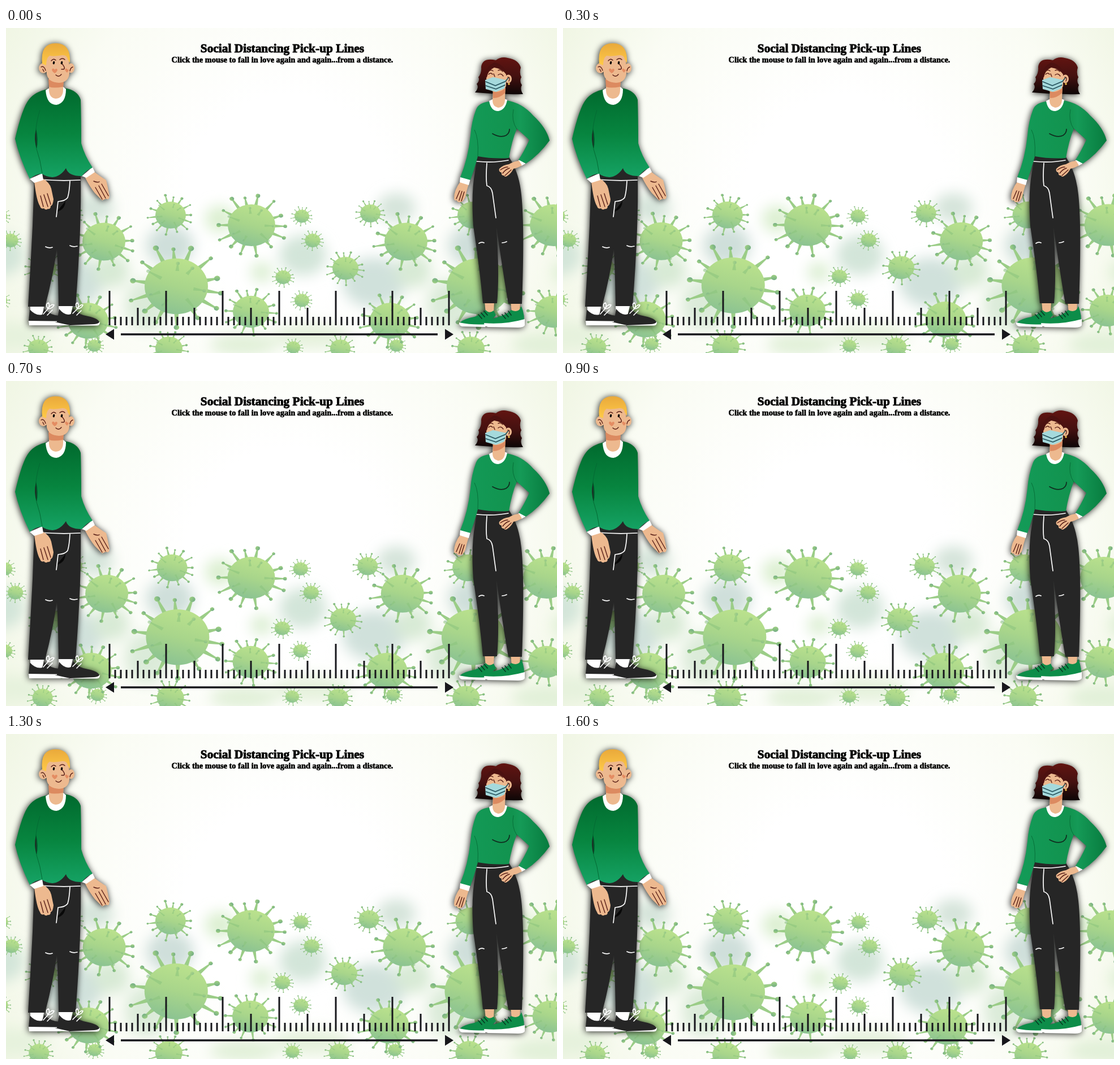
Write an HTML page that moves like this. It is 974x575 px and loops after 1700 ms.

```html
<!DOCTYPE html>
<html lang="en">
<head>
<meta charset="utf-8">
<title>Social Distancing Pick-up Lines</title>
<style>
html, body { margin: 0; width: 100%; height: 100%; overflow: hidden; }
svg { display: block; width: 974px; height: 575px; }
.person { filter: drop-shadow(-1px 1px 6px rgba(0, 0, 0, .85)); }
.line { fill: none; stroke-width: 1.7; stroke-linecap: round; stroke-linejoin: round; }
.white { stroke: #fff; }
.brown { stroke: #5a2018; stroke-width: 1.4; }
.skin { fill: #edb98f; }
.shade { fill: #dc8a60; }
.pants { fill: #262626; }
text { font: bold 21.4px "Liberation Serif", Times, serif; text-anchor: middle; stroke: #000; stroke-width: .9; }
.sub { font-size: 14.4px; stroke-width: .6; }
</style>
</head>
<body>
<svg viewBox="0 0 974 575">
<defs>
  <radialGradient id="sky" gradientUnits="userSpaceOnUse" cx="500" cy="300" r="600">
    <stop offset=".3" stop-color="#fff"/><stop offset=".7" stop-color="#fafcf4"/><stop offset="1" stop-color="#eff5e2"/>
  </radialGradient>
  <linearGradient id="body" x1=".65" y1="0" x2=".35" y2="1">
    <stop stop-color="#bbe28d"/><stop offset=".5" stop-color="#a8d58b"/><stop offset="1" stop-color="#8ac292"/>
  </linearGradient>
  <linearGradient id="knob" x1=".6" y1="0" x2=".4" y2="1">
    <stop stop-color="#9fd083"/><stop offset="1" stop-color="#74ae84"/>
  </linearGradient>
  <linearGradient id="knit" gradientUnits="userSpaceOnUse" x1="0" y1="108" x2="0" y2="268">
    <stop stop-color="#016a2e"/><stop offset=".5" stop-color="#07853f"/><stop offset="1" stop-color="#16a466"/>
  </linearGradient>
  <linearGradient id="top" gradientUnits="userSpaceOnUse" x1="815" y1="0" x2="960" y2="0">
    <stop stop-color="#139a57"/><stop offset=".55" stop-color="#12934f"/><stop offset=".65" stop-color="#159a57"/><stop offset="1" stop-color="#087c3f"/>
  </linearGradient>
  <linearGradient id="blond" x1="0" y1="0" x2="0" y2="1">
    <stop stop-color="#e9a93b"/><stop offset="1" stop-color="#ffca48"/>
  </linearGradient>
  <linearGradient id="brunette" x1="0" y1="0" x2="0" y2="1">
    <stop stop-color="#611411"/><stop offset=".5" stop-color="#451110"/><stop offset="1" stop-color="#0d0606"/>
  </linearGradient>
  <filter id="soft" x="-20%" y="-50%" width="140%" height="200%"><feGaussianBlur stdDeviation="12"/></filter>
  <g id="rim"></g>
  <g id="front"></g>
</defs>

<rect width="974" height="575" fill="url(#sky)"/>
<g id="clouds" filter="url(#soft)"></g>
<g id="viruses"></g>

<text x="488.5" y="43">Social Distancing Pick-up Lines</text>
<text x="488.5" y="61" class="sub">Click the mouse to fall in love again and again...from a distance.</text>

<g fill="#17171c">
  <path id="ticks" fill="none" stroke="#17171c" stroke-width="3"/>
  <path d="M203 540.3H763V543.8H203ZM176 542L191 532.5V551.5ZM791 542L776 532.5V551.5Z"/>
</g>

<g class="person">
  <path class="pants" d="M50 266L62 255L106 247L132 258Q134 350 123 492H93Q92 430 90 390Q83 440 69 493H39Q43 430 47 350Z"/>
  <path class="line white" d="M60 268Q95 271 131 269M113 271Q112 290 109 300Q105 306 92 307L89 334M70 387Q76 390 82 388M113 385Q119 388 126 386"/>
  <path d="M92 322Q100 313 105 306Q105 320 91 325Z" fill="#080808"/>

  <path fill="#fff" d="M43 493H67L64 509H43ZM93 492H118L114 509H94Z"/>
  <path fill="#262626" d="M40 519L42 498Q53 510 64 507L68 497Q78 508 94 509Q115 512 116 520Z"/>
  <path fill="#fff" d="M40 518L116 519V526H41Z"/>
  <path fill="#262626" d="M90 520L94 497Q104 510 115 506L119 496Q129 508 145 510Q164 514 165 521Z"/>
  <path fill="#fff" d="M113 525L166 520Q166 526 161 526.5H113Z"/>
  <path fill="#262626" d="M86 520H165Q164 523 156 524L113 526Z"/>
  <path class="line white" d="M66 506L74 497Q69 488 75 486Q78 490 74 497Q80 487 85 490Q83 496 74 497M73 508L82 499M118 505L126 497Q121 488 126 486Q130 489 126 497Q132 488 136 490Q134 496 126 497M125 508L133 500"/>

  <path class="skin" d="M50 272L66 267Q77 273 80 284L84 303Q83 314 79 315Q79 321 74 320Q70 323 67 319Q62 321 60 315Q54 306 50 272Z"/>
  <path class="line brown" d="M61 297L66 316M67 295L74 316M73 293L79 312"/>
  <path class="skin" d="M139 263L154 253Q167 263 177 269Q180 281 183 298Q182 305 177 302L170 305L157 292Q148 281 139 263Z"/>
  <path class="line brown" d="M155 271Q162 274 165 272M158 282L170 303M164 279L176 301M169 276L181 297"/>
  <path fill="#fff" d="M42 267L64 257L66 269L50 274ZM134 262L153 246L157 255L142 265Z"/>

  <path fill="url(#knit)" d="M73 108Q51 113 41 126Q29 140 16 196Q23 228 42 267Q52 258 64 258Q70 263 82 264Q96 263 106 248Q110 262 134 262Q141 252 153 247Q139 226 133 204Q133 160 132 127Q127 110 103 106Z"/>
  <path fill="#00542a" d="M53 177Q49 197 54 215Q58 198 53 177Z"/>
  <path fill="#202b25" d="M53 181Q49 196 54 212Z"/>
  <path fill="none" stroke="#046a34" stroke-width="1" d="M60 145Q54 165 53 179M54 214Q61 234 64 257"/>

  <path fill="#fff" d="M70 110Q72 136 89 136Q106 133 106 108L101 104L75 107Z"/>
  <path class="skin" d="M76 82L102 84L101 109Q101 124 88 125Q77 124 76 111Z"/>
  <path class="shade" d="M75 90Q86 99 102 95L101 104Q84 107 76 104Z"/>
  <ellipse class="skin" cx="66" cy="71" rx="8" ry="9"/>
  <ellipse class="skin" cx="115" cy="71" rx="6" ry="8.5"/>
  <path class="skin" d="M70 46H111L112 80Q111 96 94 97Q75 96 72 82Z"/>
  <path fill="url(#blond)" d="M64 63Q60 27 88 27Q115 27 113 62L109 55Q108 48 100 48Q85 51 77 49Q71 53 71 66Z"/>
  <path class="line brown" d="M62 69Q67 66 70 75M65 73L67 77M118 69Q114 70 113 76M98 62Q106 71 102 73H98M80 58Q84 53 88 57M95 56Q100 52 104 56M88 83Q93 88 98 82"/>
  <path d="M83 61a1.6 2.2 0 1 0 3 1a1.6 2.2 0 1 0-3-1M97 61a1.6 2.2 0 1 0 3 1a1.6 2.2 0 1 0-3-1"/>
  <path fill="#e48c62" d="M86 80Q79 75 82 72Q85 71 86 74Q89 70 91 74Q90 78 86 80M108 79Q103 75 105 72Q108 71 109 74Q111 72 111 75Z"/>
</g>

<g class="person">
  <path class="skin" d="M846 484H863L862 505H848ZM892 484H909L908 505H894Z"/>
  <path class="pants" d="M834 226Q863 229 889 228Q907 255 911 295Q917 350 912 488H888Q878 430 866 345Q873 430 868 487H843Q838 430 826 350Q822 290 829 255Z"/>
  <path class="line white" d="M832 236Q862 239 888 234M850 239Q848 265 850 279Q858 281 860 292L866 336M836 381Q840 378 845 380M877 380Q881 380 885 378"/>

  <path class="skin" d="M803 272L818 276Q814 288 812 299Q807 309 803 308Q798 309 797 305Q792 306 792 301Q792 287 803 272Z"/>
  <path class="line brown" d="M802 288L796 302M806 289L801 305M810 290L805 306"/>
  <path fill="#fff" d="M803 263L821 267L818 278L802 273ZM905 235L914 229L920 239L911 244Z"/>
  <path class="skin" d="M907 235L912 243Q904 248 897 249Q893 257 887 261Q882 265 880 261Q875 261 876 256Q870 254 872 249Q879 242 889 241Q899 235 907 235Z"/>
  <path class="line brown" d="M874 251Q881 246 887 246M878 257Q883 250 890 248M882 261L893 251"/>

  <path fill="url(#top)" d="M854 130Q836 132 831 144Q823 165 821 190Q817 230 803 264L821 269Q828 250 834 227Q861 232 889 230Q894 200 903 178L925 198Q915 220 906 233L919 240Q942 225 961 199Q955 176 932 155Q912 132 884 128Z"/>
  <path fill="none" stroke="#077039" d="M828 180Q836 195 834 227M897 144Q893 164 903 179"/>
  <path class="line" stroke="#102b1e" d="M860 187Q874 195 884 190Q890 186 890 179"/>

  <path fill="url(#brunette)" d="M866 57Q875 50 887 53Q906 56 910 70Q907 80 911 87Q907 94 912 101Q908 108 914 117Q872 118 829 114Q837 105 832 99Q838 93 835 87Q841 80 840 69Q842 52 866 57Z"/>
  <path fill="#fff" d="M854 129Q857 147 870 147Q883 145 886 127L880 125L860 126Z"/>
  <path class="skin" d="M861 105L883 100L882 128Q881 140 870 141Q860 139 860 128Z"/>
  <path class="shade" d="M861 112Q874 116 883 105L882 115Q873 124 861 124Z"/>
  <ellipse class="skin" cx="888" cy="90" rx="6" ry="7.5"/>
  <path class="skin" d="M849 87Q849 73 860 67Q876 65 884 80V103Q877 113 864 113Q849 110 849 87Z"/>
  <path fill="#4c1110" d="M848 89Q845 70 863 61Q879 63 887 83L884 82Q877 72 863 70Q852 75 850 87Z"/>
  <path fill="#a5d9dc" d="M847 92L861 87L884 92L881 107L866 113L848 108Z"/>
  <path class="line" stroke="#24525c" stroke-width="1.3" d="M848 95L865 102L884 94M848 102L866 108L882 101M884 93L888 88"/>
  <path class="line brown" d="M853 82Q857 78 860 82M870 83Q875 79 879 85M854 76Q858 73 861 76M870 75Q875 73 878 77M862 81L864 86M887 87Q892 87 889 94"/>
  <circle cx="889" cy="99" r="1.8" fill="#f2c14a"/>

  <path fill="#0d8d49" d="M848 499Q838 510 819 513Q805 517 801 523L850 526L866 508L862 500Q854 506 848 499Z"/>
  <path fill="#fff" d="M801 521Q825 526 850 524L847 529L806 528Q800 526 801 521Z"/>
  <path fill="#0d8d49" d="M893 499Q883 509 864 513Q850 517 846 524H915Q918 509 911 492Q907 505 893 499Z"/>
  <path fill="#fff" d="M845 522Q882 525 917 515L917 526Q915 530 905 530L852 529Q845 527 845 522Z"/>
  <path class="line" stroke="#063c22" d="M835 507L841 514M840 504L846 511M845 501L851 508M877 507L883 514M882 504L888 511M888 501L893 508"/>
</g>
</svg>
<script>
const $ = id => document.getElementById(id);
const TILE = 534;
const tiled = (x, reach) => [x - TILE, x, x + TILE].filter(v => v > -reach && v < 974 + reach);

// One spike on a unit virus, pointing right before it is turned.
const spike = (angle, from, to, width, tip) => `<g transform="rotate(${angle})">
  <path d="M${from} ${-width}L${to} ${-tip * .3}V${tip * .3}L${from} ${width}Z"/>
  <circle cx="${to}" r="${tip}" fill="url(#knob)"/></g>`;
const ring = (count, make) => Array.from({ length: count }, (_, i) => make(i)).join('');

$('rim').innerHTML = ring(14, i =>
  spike(i * 360 / 14 + 4 * Math.sin(i * 5), .9, 1.42 + .1 * Math.sin(i * 2.3), .075, .08 + .015 * Math.sin(i * 3)));
$('front').innerHTML = ring(7, i =>
  spike(i * 51 + 9 * Math.sin(i * 4), .55, .9 + .14 * Math.sin(i * 2), .06, .06));

const clouds = [
  [290, 385, 42, 36, '#cfdfda'], [378, 338, 26, 24, '#dbefd0'], [525, 402, 42, 36, '#d3e5d9'],
  [452, 432, 20, 18, '#dcefd3'], [650, 450, 56, 44, '#d0e1db'], [690, 318, 34, 26, '#d5e4da'],
  [250, 490, 40, 46, '#dbebd9'], [420, 560, 60, 20, '#e1f0d8'], [540, 545, 70, 24, '#e6f2dd'],
  [720, 430, 32, 30, '#d8ead5']
];
$('clouds').innerHTML = clouds.map(([x, y, rx, ry, color]) => tiled(x, 90).map(cx =>
  `<ellipse cx="${cx}" cy="${y}" rx="${rx}" ry="${ry}" fill="${color}"/>`).join('')).join('');

// x, y, radius, turn
const kinds = [
  [288, 567, 24, 10], [591, 567, 18, 15], [508, 565, 12, 5], [690, 562, 12, 20],
  [145, 518, 36, 15], [433, 502, 32, 4], [523, 482, 13, 20],
  [66, 425, 23, 8], [490, 441, 13.5, 5], [542, 376, 13.5, 12], [523, 333, 13, 17], [110, 328, 18, 8],
  [291, 331, 27, 22], [173, 378, 38, 20], [434, 349, 42, 2], [301, 457, 56, 10]
];
const viruses = kinds.flatMap(([x, y, r, turn]) => tiled(x, r * 1.8).map(cx => ({ x: cx, y, r, turn })));
$('viruses').innerHTML = viruses.map(({ r, turn }) => `<g><g transform="scale(${r} ${r * .88})">
  <use href="#rim" fill="#9bcd87" transform="rotate(${turn})"/>
  <circle r="1" fill="url(#body)"/>
  <use href="#front" fill="#8bc47d" transform="rotate(${turn})" opacity=".55"/></g></g>`).join('');
const nodes = [...$('viruses').children];

$('ticks').setAttribute('d', ring(61, i =>
  `M${183 + i * 10} 526V${i % 10 ? i % 5 ? 511 : 495 : 465}`));

// The field shrinks gently towards its upper middle, then swells back.
function draw() {
  const step = Math.floor(performance.now() / 100) % 17;
  const s = Math.min(step, 16 - step);
  const squeeze = .0013 * s + .00025 * s * s;
  viruses.forEach(({ x, y }, i) => {
    const dx = .18 * s * s - x * squeeze;
    const dy = (310 - y) * .0037 * s;
    nodes[i].setAttribute('transform', `translate(${x + dx} ${y + dy})`);
  });
  requestAnimationFrame(draw);
}
draw();
</script>
</body>
</html>
```
